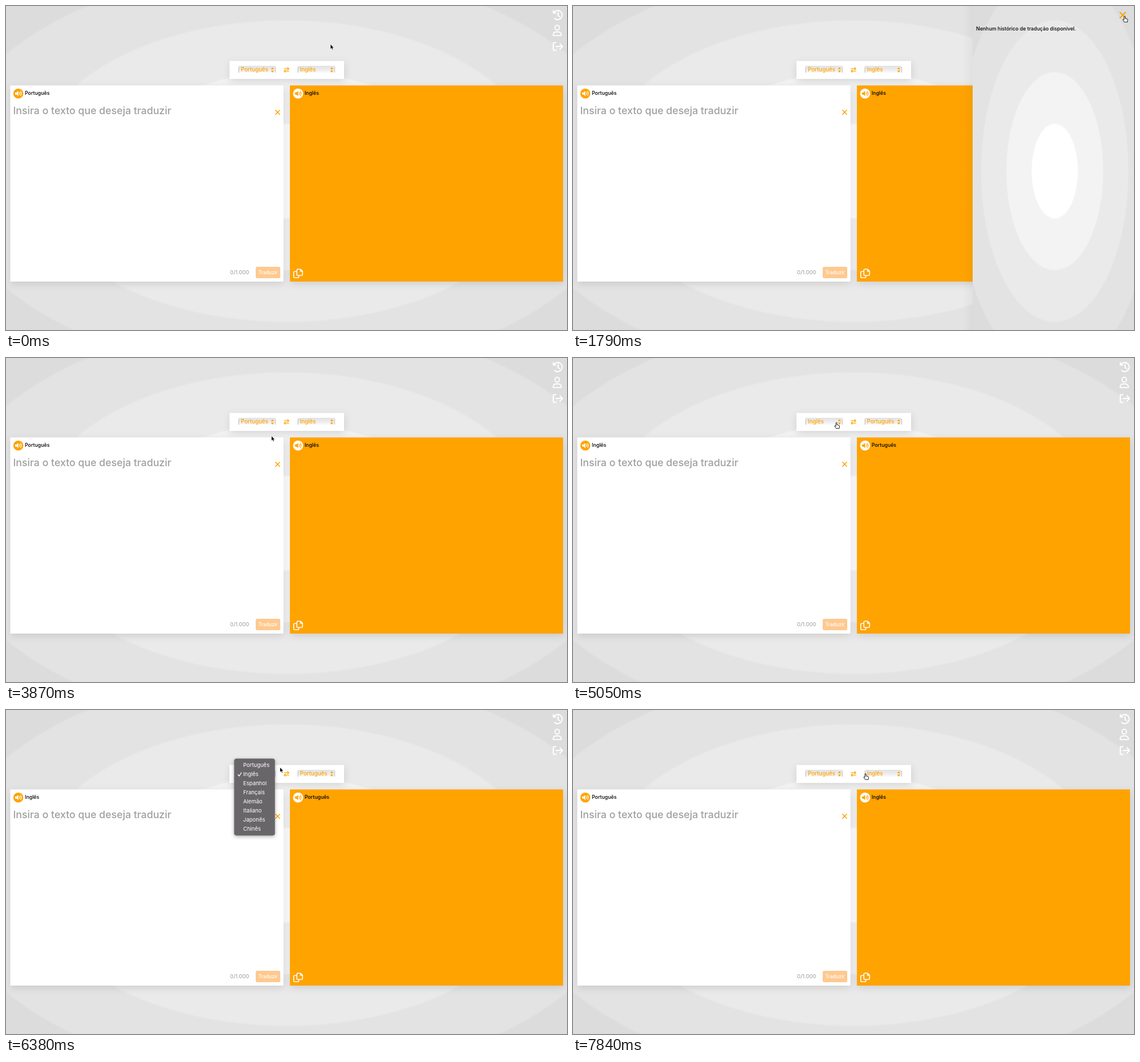
Recreate the animation shown at these times as an HTML page. Size 984 px wide and 569 px high, loop 7990 ms.

```html
<!DOCTYPE html>
<html lang="pt">
<head>
<meta charset="utf-8">
<title>Tradutor</title>
<style>
html, body { margin: 0; width: 100%; height: 100%; overflow: hidden; background: #e3e3e3; }
svg { display: block; width: 100vw; height: 100vh; }
text { font-family: Inter, "Open Sans", sans-serif; font-weight: 500; white-space: pre; }
.line { fill: none; stroke: currentColor; stroke-linecap: round; stroke-linejoin: round; }
.label { font-size: 8.8px; fill: #000; }
.pick { font-size: 9.75px; fill: #ffa300; }
.item { font-size: 9.5px; fill: #fff; font-weight: 400; }
</style>
</head>
<body>
<svg viewBox="0 0 984 569" preserveAspectRatio="none">
  <defs>
    <radialGradient id="rings" gradientUnits="userSpaceOnUse" cx="0" cy="0" r="411" gradientTransform="translate(492 290) scale(1.694 1)"/>
    <radialGradient id="sideRings" href="#rings" gradientTransform="translate(845 290) scale(.488 1)"/>
    <linearGradient id="selectFill" x2="0" y2="1">
      <stop offset="0" stop-color="#e2e2e2"/><stop offset=".5" stop-color="#ececec"/><stop offset="1" stop-color="#fff"/>
    </linearGradient>
    <linearGradient id="sideShade">
      <stop offset="0" stop-color="#000" stop-opacity="0"/><stop offset="1" stop-color="#000" stop-opacity=".04"/>
    </linearGradient>
    <filter id="soft" x="-10%" y="-30%" width="120%" height="170%">
      <feDropShadow dx="1" dy="4" stdDeviation="6.5" flood-opacity=".12"/>
    </filter>
    <filter id="menuSoft" x="-20%" y="-20%" width="140%" height="140%">
      <feDropShadow dx="0" dy="2" stdDeviation="3" flood-opacity=".28"/>
    </filter>
    <g id="select">
      <rect width="66" height="13.5" rx="3" fill="url(#selectFill)"/>
      <path d="M1 2.5V12M65 2.5V12" stroke="#d3d3d3" stroke-width="1.8"/>
      <path d="M57.3 6h5.4L60 2.4zM57.3 8.3h5.4L60 11.9z" fill="#ffa300"/>
    </g>
    <g id="speaker">
      <path d="M-5.6-1.7h2.3L.1-4.4V4.4L-3.3 1.7h-2.3z" fill="currentColor"/>
      <path class="line" d="M2-2q1.5 2 0 4M3.8-3.7q3 3.7 0 7.4" stroke-width="1.2"/>
    </g>
    <path id="cross" class="line" d="M-4-4L4 4M4-4L-4 4"/>
  </defs>

  <rect width="984" height="569" fill="url(#rings)"/>

  <g filter="url(#soft)">
    <rect x="392" y="96.5" width="201" height="31.5" fill="#fff"/>
    <rect x="7.5" y="139.5" width="479" height="344.5" fill="#fff"/>
    <rect x="498" y="139.5" width="479" height="344.5" fill="#ffa300"/>
  </g>

  <use href="#select" x="407.3" y="105"/>
  <use href="#select" x="511.3" y="105"/>
  <text id="pickL" class="pick" x="412" y="115"></text>
  <text id="pickR" class="pick" x="515.5" y="115"></text>
  <g color="#ffa300">
    <path class="line" d="M488 110.2h8M493.8 108l2.4 2.2l-2.4 2.2M496 114.4h-8M490.2 112.2l-2.4 2.2l2.4 2.2" stroke-width="1.2"/>
    <use href="#cross" transform="translate(476.4 186.6) scale(.9)" stroke-width="1.8"/>
  </g>

  <circle cx="21.6" cy="153.7" r="8.8" fill="#ffa300"/>
  <use href="#speaker" x="21.6" y="153.7" color="#fff"/>
  <circle cx="512.3" cy="153.7" r="8.8" fill="#fff"/>
  <use href="#speaker" x="512.3" y="153.7" color="#ffa300"/>
  <text id="nameL" class="label" x="33" y="156.3"></text>
  <text id="nameR" class="label" x="523.7" y="156.3"></text>

  <text x="12.5" y="190" font-size="17.75" fill="#9f9f9f">Insira o texto que deseja traduzir</text>
  <text x="393" y="470.6" font-size="9.4" fill="#999" style="font-weight:400">0/1.000</text>
  <rect x="438" y="458" width="43" height="20" rx="2.5" fill="#ffc98f"/>
  <text x="459.5" y="470.6" font-size="8.5" fill="#fff" text-anchor="middle">Traduzir</text>
  <path class="line" color="#fff" stroke-width="1.6" d="M509 466.3h-2.8q-1.5 0-1.5 1.5v8q0 1.5 1.5 1.5h6q1.5 0 1.5-1.5v-2.2M511.7 462.3h5.1l3.3 3.3v6.2q0 1.5-1.5 1.5h-6.9q-1.5 0-1.5-1.5v-8q0-1.5 1.5-1.5zM516.5 462.6v3.3h3.4"/>

  <g class="line" color="#fff" stroke-width="2">
    <g id="history" stroke="currentColor">
      <path d="M960.6 12.2a8 8 0 1 1 1.8 9.7M968.3 11.5v4.7l3 2.7"/>
      <path d="M959.7 7.8v5h5z" fill="currentColor" stroke-width="1"/>
    </g>
    <path d="M971 38.1a4.1 4.1 0 1 1-8.2 0a4.1 4.1 0 1 1 8.2 0zM959.7 51.8q-.3-6.3 5.6-6.3h3.2q5.9 0 5.6 6.3z" stroke-width="1.8"/>
    <path d="M964.5 64.2h-2.4q-2.2 0-2.2 2.2v9.4q0 2.2 2.2 2.2h2.4M965.5 71.1h10.5M971.7 66.5l4.6 4.6l-4.6 4.6"/>
  </g>

  <g id="panel">
    <rect x="683" width="18" height="569" fill="url(#sideShade)"/>
    <rect x="701" width="283" height="569" fill="url(#sideRings)"/>
    <text class="label" x="707" y="43.3">Nenhum histórico de tradução disponível.</text>
    <use href="#cross" transform="translate(964.3 16) scale(1.2)" stroke-width="1.7" color="#ffa300"/>
  </g>

  <g id="menu">
    <rect x="400.2" y="85.5" width="71.5" height="134.8" rx="4" fill="#69666a" stroke="#878588" stroke-width=".8" filter="url(#menuSoft)"/>
    <rect id="mark" x="403.5" width="65" height="16" rx="2.5" fill="#3b7ad9"/>
    <path class="line" color="#fff" d="M407 113.5l2.2 2.5l3.6-6" stroke-width="1.3"/>
    <g id="items"></g>
  </g>

  <g id="cursor">
    <path id="arrow" d="M0 0V8.8L2 7L3.3 10L4.9 9.3L3.6 6.4H6.2Z" fill="#000" stroke="#fff" stroke-width=".7"/>
    <path id="hand" d="M-.9 1.3a1 1 0 0 1 2 0V4.4L4.5 5.2Q5.7 5.6 5.5 7L4.9 10.7H-.4L-3 7Q-3.1 5.7-1.9 6L-.9 6.8Z" fill="#fff" stroke="#000" stroke-width=".9" stroke-linejoin="round"/>
  </g>
</svg>
<script>
const LOOP = 7990, STEP = 148;
const HISTORY = 1490, PANEL = 1790, CLOSE = 2690, SWAP = 4600, OPEN = 5190, CHOSEN = 6820;
const ROW = 16, TOP = 89;
const $ = id => document.getElementById(id);
const show = (id, on) => $(id).setAttribute('display', on ? 'inline' : 'none');
const during = (t, a, b) => t >= a && t < b;

// Background rings: flat tones with a narrow soft edge
const tones = ['#fff', '#f3f3f3', '#eaeaea', '#e3e3e3', '#dcdcdc'];
$('rings').innerHTML = tones.map((tone, i) => {
  const edge = 0.202 + 0.221 * i;
  const stop = at => `<stop offset="${at}" stop-color="${tone}"/>`;
  return stop(edge - 0.217) + stop(edge - 0.004);
}).join('');

const langs = ['Português', 'Inglês', 'Espanhol', 'Français', 'Alemão', 'Italiano', 'Japonês', 'Chinês'];
$('items').innerHTML = langs.map((name, i) =>
  `<text class="item" x="416" y="${TOP + 11.4 + ROW * i}">${name}</text>`).join('');

// Each move starts where the last one ended and may curve towards a bend point
const moves = [];
let last = { x: 569, y: 67 };
function move(from, to, x, y, bend) {
  const end = { x, y };
  const mid = bend || { x: (last.x + x) / 2, y: (last.y + y) / 2 };
  moves.push({ from, steps: 1 + Math.round((to - from) / STEP), span: to - from, pts: [last, mid, end] });
  last = end;
}
move(0, 0, 569, 67);
move(300, 890, 963, 23);
move(HISTORY, HISTORY, 967.5, 17.5);
move(CLOSE, CLOSE, 903.5, 28.5);
move(2840, 3720, 457, 146, { x: 88, y: 160 });
move(3870, 4300, 491, 109);
move(4900, 5050, 462, 113);
move(5490, 5940, 450, 180);
move(6090, 6240, 492, 102);
move(6380, 6380, 480.5, 100.5);
move(6530, 6530, 446, 96);
move(6970, 7700, 526, 111);
move(7840, 7840, 513, 111.5);

function pointer(t) {
  const { from, span, steps, pts: [a, b, c] } = moves.filter(m => m.from <= t).pop();
  const part = span ? (t - from) / span : 1;
  const u = Math.min(steps, 1 + Math.floor(part * (steps - 1) + 0.001)) / steps;
  const curve = k => a[k] * (1 - u) ** 2 + 2 * b[k] * u * (1 - u) + c[k] * u * u;
  return [curve('x'), curve('y')];
}

const inside = (x, y, cx, cy, rx, ry) => Math.abs(x - cx) < rx && Math.abs(y - cy) < ry;
const overButton = (x, y) =>
  inside(x, y, 968, 15, 9, 8) || inside(x, y, 492, 112, 6, 6) ||
  [440, 544].some(cx => inside(x, y, cx, 112, 33, 7));

function draw(t) {
  const [x, y] = pointer(t);
  const menu = during(t, OPEN, CHOSEN);
  const hand = overButton(x, y) && !menu;
  const row = Math.floor((y - TOP) / ROW);
  const [left, right] = during(t, SWAP, CHOSEN) ? [langs[1], langs[0]] : langs;

  for (const id of ['pickL', 'nameL']) $(id).textContent = left;
  for (const id of ['pickR', 'nameR']) $(id).textContent = right;
  $('history').setAttribute('color', during(t, HISTORY, CLOSE + 150) ? '#ffa300' : '#fff');
  show('panel', during(t, PANEL, CLOSE));
  show('menu', menu);
  show('mark', x < 472 && row >= 0 && row < langs.length);
  $('mark').setAttribute('y', TOP + ROW * row);
  show('hand', hand);
  show('arrow', !hand);
  $('cursor').setAttribute('transform', `translate(${x} ${y})`);
}

const start = performance.now();
function tick() {
  draw((performance.now() - start) % LOOP);
  requestAnimationFrame(tick);
}
tick();
</script>
</body>
</html>
```
